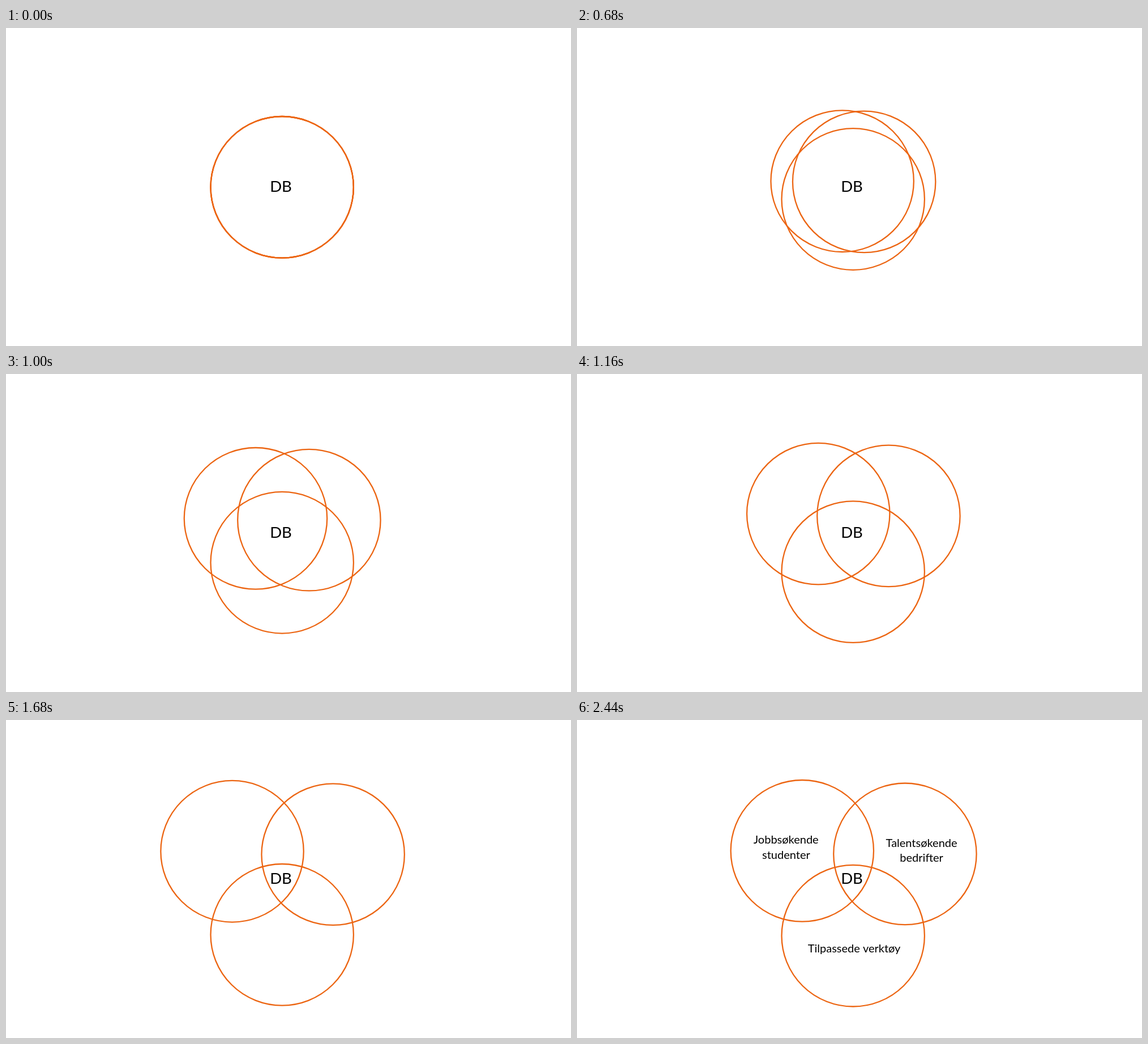
Recreate the animation shown at these times as an HTML page with a canvas. Size 998 by 561 pixels, loop 2.99 s.

```html
<!DOCTYPE html>
<html lang="no">
<head>
<meta charset="utf-8">
<title>Venn diagram</title>
<style>
  html, body { margin: 0; width: 100%; height: 100%; overflow: hidden; background: #fff; }
  canvas { display: block; }
</style>
</head>
<body>
<canvas id="stage" width="998" height="561"></canvas>
<script>
const ctx = document.getElementById('stage').getContext('2d');
const LOOP = 2990, STEP = 40;
const MOVE = { start: 115, length: 1735 };
const FADE = { start: 1910, length: 530 };
const ORIGIN = { x: 487.7, y: 280.8 };
const RADIUS = { x: 126.2, y: 124.8 };
const TARGETS = [
  { x: 397.8, y: 230.8 },
  { x: 579.4, y: 236.3 },
  { x: 487.7, y: 380.7 }
];
const LABELS = [
  ['Jobbsøkende', 369.2, 218],
  ['studenter', 369.4, 245],
  ['Talentsøkende', 608.6, 223.5],
  ['bedrifter', 608.6, 250],
  ['Tilpassede verktøy', 489.6, 410]
];

const progress = (t, { start, length }) => Math.min(1, Math.max(0, (t - start) / length));
const easeInOut = u => u < 0.5 ? 2 * u * u : 1 - 2 * (1 - u) ** 2;
const mix = (a, b, k) => a + (b - a) * k;

function drawRing(target, k) {
  ctx.beginPath();
  ctx.ellipse(mix(ORIGIN.x, target.x, k), mix(ORIGIN.y, target.y, k),
    RADIUS.x, RADIUS.y, 0, 0, Math.PI * 2);
  ctx.stroke();
}

function drawText(text, x, y, size) {
  ctx.font = `${size}px Lato, "Open Sans", sans-serif`;
  ctx.fillText(text, x, y);
}

function render(t) {
  ctx.globalAlpha = 1;
  ctx.fillStyle = '#fff';
  ctx.fillRect(0, 0, 998, 561);

  ctx.strokeStyle = '#ec6512';
  ctx.lineWidth = 2.3;
  const k = easeInOut(progress(t, MOVE));
  TARGETS.forEach(target => drawRing(target, k));

  ctx.fillStyle = '#000';
  ctx.textAlign = 'center';
  drawText('DB', 485.5, 289, 27.5);

  ctx.globalAlpha = progress(t, FADE);
  LABELS.forEach(([text, x, y]) => drawText(text, x, y, 20));
}

function tick() {
  const t = performance.now() % LOOP;
  render(Math.floor(t / STEP) * STEP);
  requestAnimationFrame(tick);
}
tick();
</script>
</body>
</html>
```
